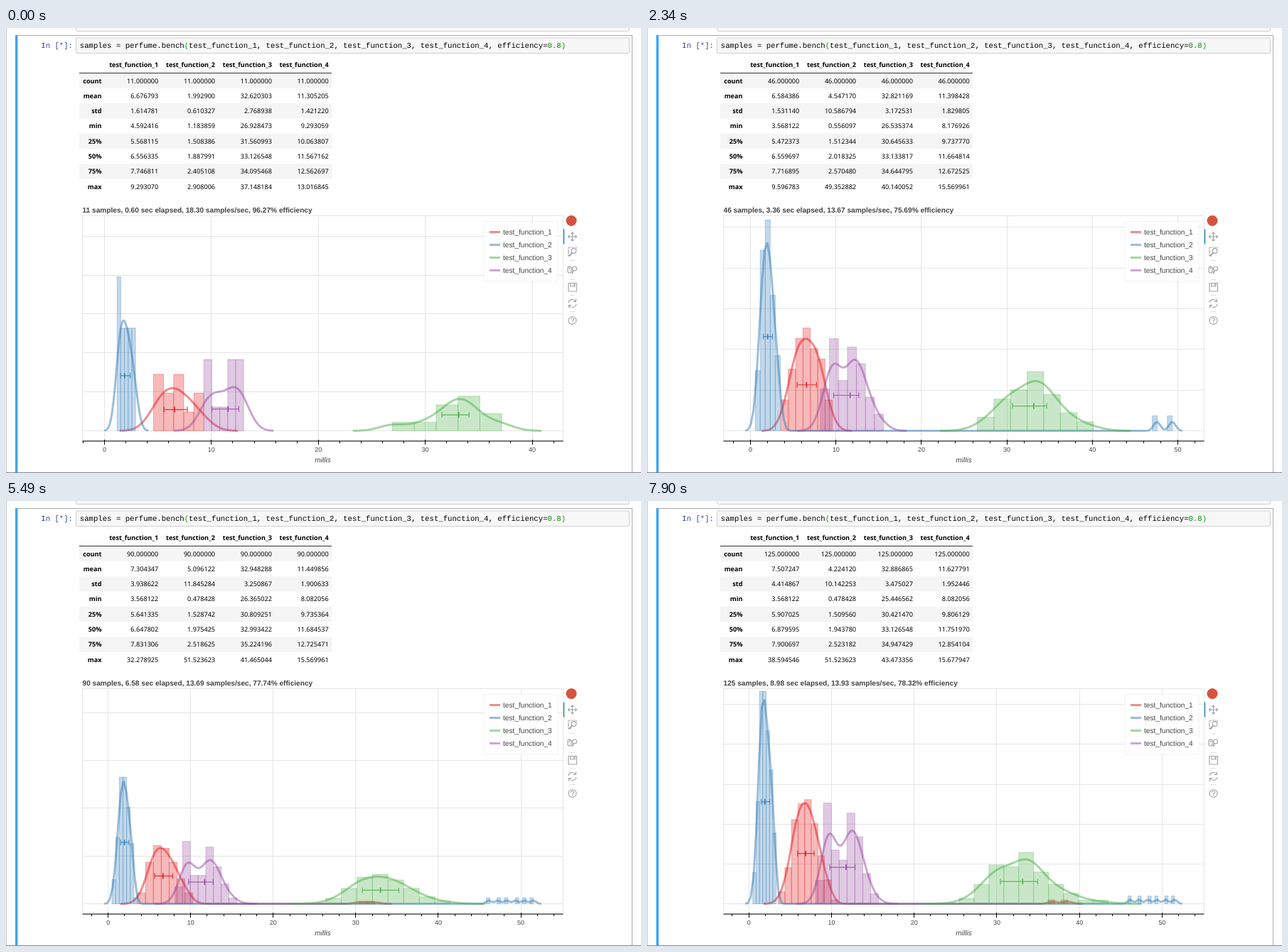
Animation of 893x627 px, one loop 8000 ms. Source, as an HTML page:

```html
<!DOCTYPE html>
<html lang="en">
<head>
<meta charset="utf-8">
<title>Benchmark notebook</title>
<style>
  html, body { margin: 0; width: 100%; height: 100%; overflow: hidden; background: #fff; }
  svg { display: block; }
  text { text-rendering: geometricPrecision; white-space: pre; }
  .code { font: 10.65px "Liberation Mono", monospace; }
  .table { font: 9.13px "Noto Sans", "Open Sans", sans-serif; text-anchor: end; }
  .plot { font: 10.15px "Liberation Sans", sans-serif; fill: #444; }
  .bold { font-weight: bold; }
  .icon { fill: none; stroke: #a1a6a9; stroke-width: 1.2; }
</style>
</head>
<body>
<svg width="893" height="627" viewBox="0 0 893 627">
  <clipPath id="clip"><rect x="107.5" y="264.5" width="676" height="317.5"/></clipPath>
  <g fill="none" stroke="#ababab">
    <path d="M.5 0V627" stroke="#ccc"/>
    <path d="M98.5 0V2.5Q98.5 4.5 100.5 4.5H874.5Q876.5 4.5 876.5 2.5V0" fill="#f7f7f7" stroke="#cfcfcf"/>
    <path d="M14 10.5H880.5V626"/>
    <path d="M0 626.5H893" stroke="#7c8797"/>
  </g>
  <rect x="13" y="10" width="3.500" height="616" fill="#42a5f5"/>
  <rect x="98.5" y="14" width="778" height="21.500" rx="1.5" fill="#f7f7f7" stroke="#cfcfcf"/>
  <text class="code" x="49.3" y="28" fill="#303f9f">In [*]:</text>
  <text class="code" x="103.8" y="28">samples = perfume.bench<tspan fill="#0a0">(</tspan>test_function_1, test_function_2, test_function_3, test_function_4, efficiency=<tspan fill="#080">0.8</tspan><tspan fill="#0a0">)</tspan></text>
  <g id="table" class="table"></g>
  <g id="chart" class="plot"></g>
  <g id="legend" class="plot"></g>
  <circle cx="795" cy="271.5" r="7.5" fill="#d5533f"/>
  <path d="M784.5 283.5V304.5" stroke="#2f8fc0" stroke-width="1.6"/>
  <path d="M793 327.5h7M793 354.5h7M793 376.5h7M793 399.5h7" stroke="#ddd"/>
  <g class="icon">
    <path d="M796.5 288v12M790.5 294h12M794.5 290l2-2 2 2M794.5 298l2 2 2-2M792.5 292l-2 2 2 2M800.5 292l2 2-2 2"/>
    <path d="M791 317v-8h11v3M791 313v8h3" stroke-dasharray="2 1"/>
    <circle cx="798.5" cy="314" r="3.3"/><path d="M796 317l-4.5 4.5" stroke-width="2"/>
    <rect x="790" y="336" width="5" height="9" rx="2.5"/><path d="M792.5 336v4"/>
    <circle cx="799.5" cy="339" r="3"/><path d="M798 342l-2 4" stroke-width="1.8"/>
    <path d="M791 359.5h11.5v11.5h-11.5zM794 360v4h6v-4M798.5 360.5v2.5"/>
    <path d="M791 387a5.5 5.5 0 0 1 10-2M802 389a5.5 5.5 0 0 1-10 2M801.5 381.5v4h-4M791.5 394.5v-4h4"/>
    <circle cx="796.5" cy="412" r="5.5"/><path d="M794.5 410.5q0-2 2-2t2 2q0 1-2 2.2v.8M796.5 414.5v1.3"/>
  </g>
</svg>
<script>
const COLORS = ['#e41a1c', '#377eb8', '#4daf4a', '#984ea3'];
const NAMES = [1, 2, 3, 4].map(i => 'test_function_' + i);
const ROWS = ['count', 'mean', 'std', 'min', '25%', '50%', '75%', 'max'];
const BENDS = [1, 1, 1, 1.6]; // above 1 crowds values towards the lower quartile
const LEFT = 107.5, RIGHT = 783.5, TOP = 264.5, BOTTOM = 582, BASE = 567.6;
const $ = id => document.getElementById(id);

// Each column reads "mean std min 25% 50% 75% max"; "=" keeps the previous value.
// unit is the height in pixels of a density of 0.1.
let last;
function state(n, sec, unit, ...columns) {
  const cols = columns.map((c, i) => c.split(' ').map((v, j) => v == '=' ? last[i][j] : +v));
  last = cols;
  return { n, sec, unit, cols };
}

const s11 = state(11, .60095, 27.45,
  '6.676793 1.614781 4.592416 5.568115 6.556335 7.746811 9.293070',
  '1.992900 0.610327 1.183859 1.508386 1.887991 2.405108 2.908006',
  '32.620303 2.768938 26.928473 31.560993 33.126548 34.095468 37.148184',
  '11.305205 1.421220 9.293059 10.063807 11.567162 12.562697 13.016845');
const s34 = state(34, 2.5401, 65.5,
  '6.633432 1.599673 3.568122 5.392935 6.551798 7.939026 9.596783',
  '4.693446 10.821887 0.607106 1.503555 1.959426 2.585915 48.509744',
  '32.891981 2.996498 26.535374 30.888131 33.304702 34.640070 38.815061',
  '11.357761 1.856547 8.176926 9.737770 11.521016 12.646498 15.569961');
const s58 = state(58, 4.1784, 49.3,
  '6.535341 1.462606 = 5.551812 6.567596 7.494763 =',
  '4.400894 10.351701 0.505088 1.521134 2.077224 2.555045 50.196021',
  '32.750357 3.348565 = 30.403135 32.962932 34.649519 41.465044',
  '11.439096 1.803063 = = 11.808613 12.698553 =');
const s68 = state(68, 4.9465, 62.2,
  '6.911756 3.254787 = 5.601748 6.573228 7.355233 30.916024',
  '4.818462 11.172001 = 1.521207 2.166511 2.583382 51.523623',
  '32.874707 3.283505 = 30.757848 32.993422 34.554744 =',
  '11.392558 1.824423 = 9.804147 11.645834 12.671969 =');
const s90 = state(90, 6.5756, 33.7,
  '7.304347 3.938622 = 5.641335 6.647802 7.831306 32.278925',
  '5.096122 11.845284 0.478428 1.528742 1.975425 2.518625 =',
  '32.948288 3.250867 26.365022 30.809251 = 35.224196 =',
  '11.449856 1.900633 8.082056 9.735364 11.684537 12.725471 =');
const s101 = state(101, 7.3338, 45.95,
  '7.269093 3.740615 = 5.634823 6.672416 7.899188 =',
  '4.747834 11.224008 = 1.509560 1.968565 2.504953 =',
  '32.950374 3.308413 = 30.699797 32.956238 34.947429 =',
  '11.670101 1.969888 = 9.807826 11.865256 12.908346 15.677947');
const s125 = state(125, 8.9766, 56.2,
  '7.507247 4.414867 = 5.907025 6.879595 7.900697 38.594546',
  '4.224120 10.142253 = = 1.943780 2.523182 =',
  '32.886865 3.475027 25.446562 30.421470 33.126548 = 43.473356',
  '11.627791 1.952446 = 9.806129 11.751970 12.854104 =');

const lerp = (a, b, t) => a + (b - a) * t;
const between = (a, b, n, sec, t = .5) => ({
  n, sec, unit: lerp(a.unit, b.unit, t),
  cols: b.cols.map((c, i) => c.map((v, j) => lerp(a.cols[i][j], v, t)))
});

const STEPS = [ // table time, chart time, state
  [0, 0, s11],
  [760, 800, between(s11, s34, 22, 1.412, .9)],
  [1460, 1510, s34],
  [2340, 2340, between(s34, s58, 46, 3.364)],
  [3120, 3120, s58],
  [3850, 3900, s68],
  [4710, 4710, between(s68, s90, 79, 5.762)],
  [5490, 5490, s90],
  [6230, 6280, s101],
  [7110, 7110, between(s101, s125, 113, 8.157)],
  [7860, 7900, s125]
];

const text = (x, y, s, attrs = '') => `<text x="${x}" y="${y}" ${attrs}>${s}</text>`;
const path = (d, attrs) => `<path d="${d}" ${attrs}/>`;
const range = (n, f) => Array.from({ length: n }, (_, i) => f(i));

function drawTable({ n, cols }) {
  const right = i => 214.3 + i * 79.8;
  let out = '';
  ROWS.forEach((name, r) => {
    const y = 63.5 + r * 21.33;
    if (r % 2 == 0) out += `<rect x="103" y="${y}" width="355" height="21.33" fill="#f5f5f5"/>`;
    out += text(134.5, y + 14, name, 'class="bold"');
    cols.forEach((c, i) => out += text(right(i), y + 14, (r ? c[r - 1] : n).toFixed(6)));
  });
  NAMES.forEach((name, i) => out += text(right(i), 55, name, 'class="bold"'));
  $('table').innerHTML = out + path('M103 63.5H458', 'stroke="#333"');
}

// Normal quantile, close enough for plotting
const probit = u => 4.91 * (u ** .14 - (1 - u) ** .14);

// Samples that follow a bell curve through the five quantiles, with far outliers split off
function sample([mean, , min, q1, mid, q3, max], n, bend) {
  const fence = q3 + 1.5 * (q3 - q1), center = (q1 + q3) / 2;
  const far = max > q3 + 6 * (q3 - q1) ? Math.max(1, Math.round((mean - center) * n / (max - center))) : 0;
  const marks = [min, q1, mid, q3, far ? fence : max];
  const knots = [.5 / n, .25, .5, .75, 1 - .5 / n].map(probit);
  const spread = Math.min(1.8 * (far - 1), 5.4);
  return range(n, i => {
    const rank = n - 1 - i;
    if (rank < far) return max - (far > 1 ? spread * rank / (far - 1) : 0);
    const z = probit((i + .5) / n);
    const k = Math.max(0, Math.min(3, knots.findIndex(v => z <= v) - 1));
    const t = Math.max(0, (z - knots[k]) / (knots[k + 1] - knots[k]));
    return lerp(marks[k], marks[k + 1], k == 1 ? t ** bend : t);
  });
}

function shape(stats, n, bend) {
  const [, std, min, q1, mid, q3, max] = stats, iqr = q3 - q1;
  const points = sample(stats, n, bend);
  const bins = Math.ceil(Math.max(Math.log2(n) + 1, (max - min) / (2 * iqr * n ** (-1 / 3))));
  const width = (max - min) / bins;
  const counts = Array(bins).fill(0);
  points.forEach(p => counts[Math.min(bins - 1, Math.floor((p - min) / width))]++);
  const bars = counts.map((c, i) => [min + i * width, c / n / width]).filter(b => b[1]);

  const band = 1.059 * Math.min(std, iqr / 1.349) * n ** -.2;
  const lo = min - 3 * band, hi = max + 3 * band;
  const curve = range(160, i => {
    const x = lerp(lo, hi, i / 159);
    const sum = points.reduce((s, p) => s + Math.exp(-(((x - p) / band) ** 2) / 2), 0);
    return [x, sum / (n * band * Math.sqrt(2 * Math.PI))];
  });
  return { width, bars, curve, lo, hi, q1, mid, q3, top: Math.max(...curve.map(p => p[1])) };
}

function drawChart({ n, sec, unit, cols }) {
  const shapes = cols.map((c, i) => shape(c, n, BENDS[i]));
  const lo = Math.min(...shapes.map(s => s.lo)), hi = Math.max(...shapes.map(s => s.hi));
  const k = 614.5 / (hi - lo);
  const X = v => +(138.2 + (v - lo) * k).toFixed(2);
  const Y = v => +(BASE - v * unit * 10).toFixed(2);
  const snap = v => Math.floor(v) + .5;

  let grid = '', ticks = '', labels = '';
  for (let v = -4; v < 70; v += 2) {
    const x = snap(X(v));
    if (x < LEFT || x > RIGHT) continue;
    const major = v % 10 == 0;
    ticks += `M${x} ${major ? 580 : 582}V${major ? 587 : 585}`;
    if (major) {
      grid += `M${x} ${TOP}V${BOTTOM}`;
      labels += text(X(v), 597, v, 'text-anchor="middle" font-size="9"');
    }
  }
  const step = unit < 40 ? .2 : .1;
  for (let v = 0; Y(v) > TOP; v += step) grid += `M${LEFT} ${snap(Y(v))}H${RIGHT}`;

  const body = shapes.map((s, i) => {
    const ink = `stroke="${COLORS[i]}"`, w = (s.width * k).toFixed(2), y = Y(s.top / 2);
    const bars = s.bars.map(([x, d]) => `M${X(x)} ${BASE}V${Y(d)}h${w}V${BASE}z`).join('');
    const line = 'M' + s.curve.map(([x, d]) => X(x) + ' ' + Y(d)).join('L');
    const cap = v => `M${X(v)} ${y - 4}v8`;
    return path(bars, `fill="${COLORS[i]}" ${ink} fill-opacity=".3" stroke-opacity=".3"`)
      + path(line, `fill="none" ${ink} stroke-width="3" stroke-opacity=".5"`)
      + path(`M${X(s.q1)} ${y}H${X(s.q3)}` + cap(s.q1) + cap(s.q3), `${ink} stroke-width="1.2" opacity=".85"`)
      + path(cap(s.mid), `${ink} stroke-width="1.6"`);
  }).join('');

  const busy = cols.reduce((sum, c) => sum + c[0], 0) * n / sec / 10;
  const title = `${n} samples, ${sec.toFixed(2)} sec elapsed, ${(n / sec).toFixed(2)} samples/sec, ${busy.toFixed(2)}% efficiency`;
  $('chart').innerHTML = text(107.5, 259.5, title, 'class="bold"')
    + path(grid, 'stroke="#e5e5e5"')
    + `<rect x="${LEFT}" y="${TOP}" width="676" height="317.5" fill="none" stroke="#e5e5e5"/>`
    + `<g clip-path="url(#clip)">${body}</g>`
    + path(`M${LEFT} 582H${RIGHT}` + ticks, 'stroke="#000"')
    + labels + text(445.5, 612, 'millis', 'text-anchor="middle" font-style="italic"');
}

$('legend').innerHTML = '<rect x="672" y="272.5" width="104" height="84.5" fill="#fff" fill-opacity=".95" stroke="#e5e5e5" stroke-opacity=".5"/>'
  + NAMES.map((name, i) => path(`M680 ${287.5 + 18 * i}h15`, `stroke="${COLORS[i]}" stroke-width="3" stroke-opacity=".5"`)
    + text(699, 291 + 18 * i, name)).join('');

const shown = [-1, -1];
function frame() {
  const t = performance.now() % 8000;
  [drawTable, drawChart].forEach((draw, part) => {
    const i = STEPS.filter(s => s[part] <= t).length - 1;
    if (i != shown[part]) draw(STEPS[shown[part] = i][2]);
  });
  requestAnimationFrame(frame);
}
frame();
</script>
</body>
</html>
```
